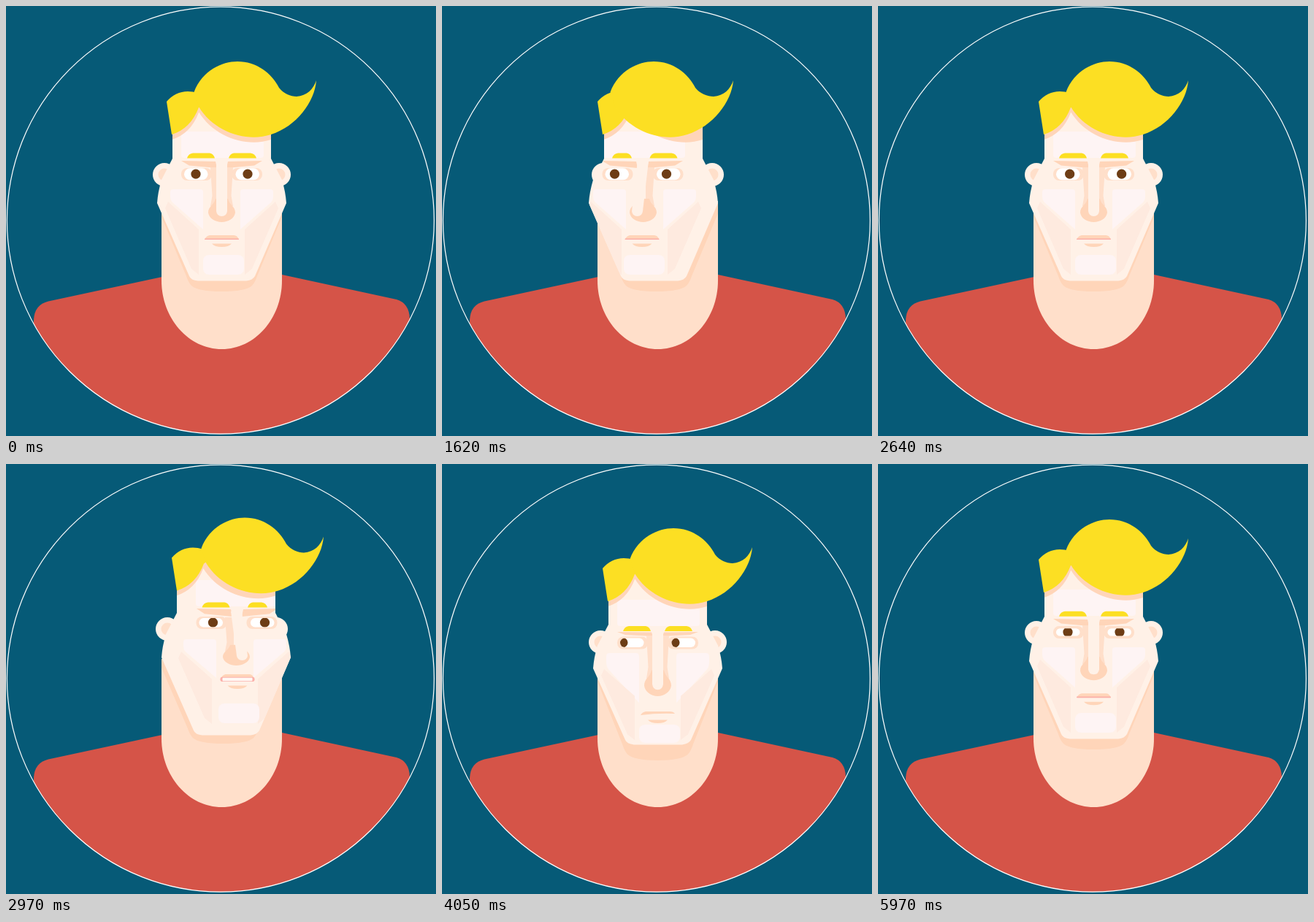
Animation of 589x589 px, one loop 6 s. Source, as an HTML page with a canvas:

```html
<!DOCTYPE html>
<html lang="en">
<head>
<meta charset="utf-8">
<title>Portrait</title>
<style>
  html, body { margin: 0; width: 100%; height: 100%; overflow: hidden; background: #065a77; }
  canvas { display: block; }
</style>
</head>
<body>
<canvas id="stage" width="589" height="589"></canvas>
<script>
const ctx = document.getElementById('stage').getContext('2d');
const LOOP = 6000;
const SEA = '#065a77', SKIN = '#fff1e7', NECK = '#ffdfca', SHADE = '#ffd5b9', GLOW = '#fef4f4',
      JAW = '#feeadf', HAIR = '#fcdf23', PINK = '#fbb0aa';

// Motion: every pose eases in at one time and out at another
function ramp(t, start, length) {
  const u = Math.min(1, Math.max(0, (t - start) / length));
  return u * u * (3 - 2 * u);
}
const pulse = (t, on, off, release = 270) => ramp(t, on, 240) - ramp(t, off, release);

const yawAt = t => pulse(t, 2640, 3330) - pulse(t, 1350, 2060) - .5 * pulse(t, 4080, 5130, 120);
const pitchAt = t => pulse(t, 3400, 5130, 120) - pulse(t, 2640, 3330) + .12 * pulse(t, 5130, 5790, 210);
const gazeAt = t => 3 * yawAt(t) + 10 * (yawAt(t + 80) - yawAt(t))
  + (t >= 600 && t < 1050 ? 8 : 0) - 11.5 * pulse(t, 3740, 4150);
const lidsAt = t => Math.min(...[140, 1050, 5880].map(mid => Math.min(1, Math.abs(t - mid) / 120) ** 1.6));

let yaw = 0, pitch = 0;

// Transform of a layer moved with the head; top and bottom are [y, shift looking down, shift looking up]
function layer(turn, top, bottom) {
  const moved = ([y, down, up]) => y + (pitch > 0 ? down : -up) * pitch;
  const y = moved(top), scale = bottom ? (moved(bottom) - y) / (bottom[0] - top[0]) : 1;
  return [1, 0, 0, scale, turn * yaw, y - top[0] * scale];
}

function place(matrix, draw) {
  ctx.save();
  ctx.transform(...matrix);
  draw();
  ctx.restore();
}

// Draws a part and its mirror image; side is 1 or -1
function both(draw) {
  draw(1);
  place([-1, 0, 0, 1, 591, 0], () => draw(-1));
}

const away = side => Math.min(1, Math.max(0, -yaw * side));

function fill(color, d) {
  ctx.fillStyle = color;
  ctx.fill(d instanceof Path2D ? d : new Path2D(d));
}

function pill(color, x, y, w, h, r) {
  ctx.fillStyle = color;
  ctx.beginPath();
  ctx.roundRect(x, y, w, h, Math.min(r, h / 2));
  ctx.fill();
}

function disc(color, x, y, r) {
  ctx.fillStyle = color;
  ctx.beginPath();
  ctx.arc(x, y, r, 0, 7);
  ctx.fill();
}

function body() {
  const frame = new Path2D();
  frame.arc(293.9, 293.7, 292.5, 0, 7);
  ctx.save();
  ctx.clip(frame);
  fill('#d55448', 'M38 600V430Q39 409 58 404.500L214 371L378 368L535 402Q552 407 553 428V600Z');
  ctx.restore();
  ctx.strokeStyle = '#fff';
  ctx.lineWidth = 1.2;
  ctx.stroke(frame);

  const neck = new Path2D('M213 267H378V376C378 428 341 470 295.5 470S213 428 213 376Z');
  fill(NECK, neck);
  ctx.save();
  ctx.clip(neck);
  place(layer(2, [270, 8, -5], [391, 15, -8]), () =>
    fill(SHADE, 'M205 270L247 370Q250 379 254 383Q263 391 295.500 391T337 383Q341 379 344 370L386 270Z'));
  ctx.restore();
}

function ears() {
  place(layer(0, [231, 13, -5]), () => both(() => {
    const x = 217 + 4 * Math.abs(yaw);
    disc(SKIN, x, 231, 16);
    disc(NECK, x, 231, 8.5);
  }));
}

function hair(color, drag, fringeTurn, quiffTurn) {
  const x = base => base + drag;
  place(layer(fringeTurn, [130, 12, -2.5]), () =>
    fill(color, 'M220 131Q232 117 249 117Q256 117 262 119L274 132L264 139Q253 168 227 176Z'));
  place(layer(quiffTurn, [130, 12, -2.5]), () =>
    fill(color, `M257.500 118C269 88 296 76 317 76C343 76 364 92 374 112C380 120 ${x(390)} 124 ${x(398)} 124
      C${x(412)} 123 ${x(421)} 114 ${x(425)} 102C${x(423)} 131 398 165 363 176C330 187 285 173 264 138Z`));
}

function panels() {
  place(layer(20, [208, 14, -13]), () => pill(GLOW, 240, 172, 113, 36, 4));
  place(layer(18, [251, 8, -11], [305, 21, -13]), () => both(() =>
    fill(GLOW, 'M229 251H266Q270 251 270 255V306L228 269Q225 266 225 260V255Q225 251 229 251Z')));
  place(layer(18, [268, 13, -11], [368, 10, -12]), () => both(() =>
    fill(JAW, 'M222 268L264 306V368L254 360L218 277Z')));
  place(layer(21, [341, 16, -13], [368, 14, -13]), () => pill(GLOW, 270, 341, 56, 27, 8));
}

function eyes(gaze, open) {
  place(layer(21, [212, 18, -14], [222, 14, -13]), () => both(() =>
    fill(SHADE, 'M240 212L287 213L289 222L251 218.500Z')));
  place(layer(20.5, [202, 20.5, -12]), () => both(side => {
    const half = 19 - 5.5 * away(side);
    const l = 267 - half, r = 267 + half;
    fill(HAIR, `M${l} 208.500Q${l + 2} 202 ${l + 8} 201.500H${r - 7}Q${r - 2} 202 ${r} 208.500Z`);
  }));
  place(layer(20.5, [230, 14.5, -13]), () => both(side => {
    const h = 16 * open;
    pill(NECK, 240, 222, 42, 17, 8);
    pill('#fff', 244, 230.3 - h / 2, 32.5, h, 8);
    ctx.save();
    ctx.clip();
    disc('#6d3d15', 260 + gaze * side, 230.2, 6.6);
    ctx.restore();
  }));
}

function nose() {
  place(layer(20, [221, 14, -11], [296, 22, -20]), () => {
    both(side => {
      const x = 280 + 8 * away(side);
      fill(NECK, `M${x} 221H292V274H${x}L${x + 2.5} 260Z`);
    });
    fill(SHADE, 'M287 264C285 273 277 274 277 283C278 291 287 296 295.500 296S313 291 314 283C314 274 306 273 304 264Z');
    const bend = 8 * yaw;
    fill(SKIN, `M288 212H303L${303 + bend} 281Q${302 + bend} 288 ${295.5 + bend} 288T${288 + bend} 281Z`);
  });
}

function mouth(purse, teeth) {
  const frown = Math.max(0, pitch), half = 23.5 - 6.5 * purse;
  const l = 295.5 - half, r = 295.5 + half;
  place(layer(21.5, [318, 23, -24]), () => {
    const top = 314 + 2 * (frown - teeth - purse);
    fill(SHADE, `M${l} ${320 + frown}Q${l + 2} ${top + 1} ${l + 7} ${top}H${r - 7}Q${r - 2} ${top} ${r} ${320 - frown}
      Q295.500 ${320 - 2 * frown} ${l} ${320 + frown}Z`);
    const thick = 1.6 * (1 - frown) + 4.4 * purse + 4.6 * teeth;
    pill(PINK, l, 320 - thick + 2 * teeth, half * 2, thick, .8 + 2 * teeth);
    pill('#fff8f4', l + 3, 319 - 2.2 * teeth, half * 2 - 6, 4.4 * teeth, 1);
  });
  place(layer(21.5, [327, 25, -22]), () => {
    const w = 13.5 - 3.5 * purse;
    fill(SHADE, `M${295.5 - w} 325.500H${295.5 + w}Q${291.5 + w} 330 295.500 330T${295.5 - w} 325.500Z`);
  });
}

function head(t) {
  const drag = 9 * (yawAt(t - 80) - yaw);
  const face = new Path2D();
  face.addPath(
    new Path2D('M228 130V209L213 238Q208 255 207 270L251 370Q253 375.500 263 376.500H329Q338 375.500 341 370L384 270Q383 255 378 238L363 209V130Z'),
    new DOMMatrix(layer(6, [209, 11, -5], [376, 8, -5])));

  ears();
  fill(SKIN, face);
  ctx.save();
  ctx.clip(face);
  panels();
  place([1, 0, 0, 1, 0, 7], () => hair(SHADE, 0, 6, 6));
  eyes(gazeAt(t), lidsAt(t) * (1 - .22 * Math.abs(pitch)));
  nose();
  mouth(pulse(t, 2000, 2320), pulse(t, 2680, 3330));
  ctx.restore();
  hair(HAIR, drag, 7, yaw < 0 ? 27 : 10);
}

function render(now) {
  const t = now % LOOP;
  yaw = yawAt(t);
  pitch = pitchAt(t);
  ctx.fillStyle = SEA;
  ctx.fillRect(0, 0, 589, 589);
  body();
  head(t);
  requestAnimationFrame(render);
}
requestAnimationFrame(render);
</script>
</body>
</html>
```
